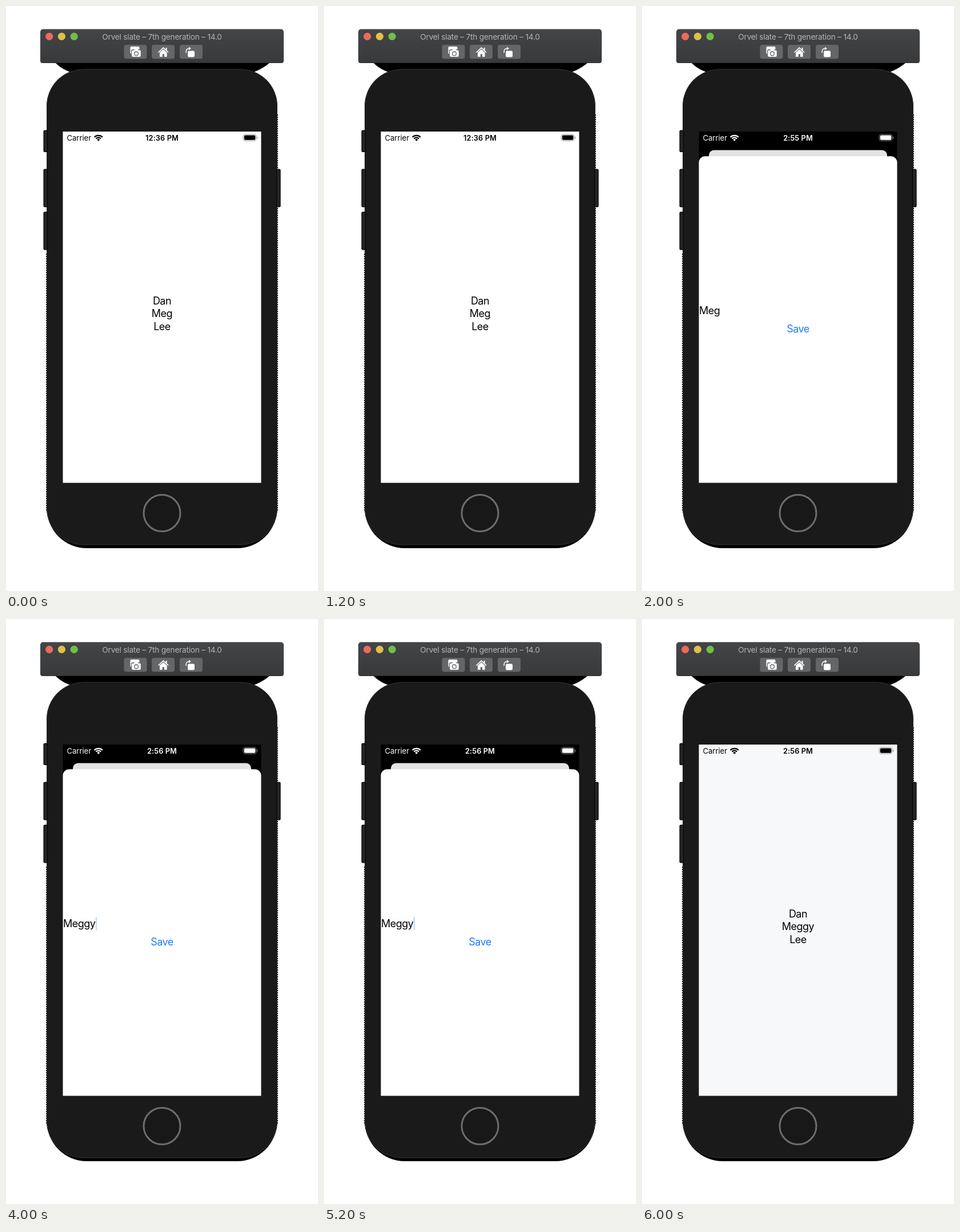
An HTML page with a canvas that plays this animation: 546x1025 px, repeating every 8000 ms.

```html
<!DOCTYPE html>
<html lang="en">
<head>
<meta charset="utf-8">
<title>Phone simulator</title>
<style>
html, body { margin: 0; width: 100%; height: 100%; overflow: hidden; background: #fff; }
canvas { display: block; width: 546px; height: 1025px; }
</style>
</head>
<body>
<canvas id="stage"></canvas>
<script>
const W = 546, H = 1025, STEP = 2000;
const canvas = document.getElementById('stage');
const ctx = canvas.getContext('2d');
const dpr = window.devicePixelRatio || 1;
canvas.width = W * dpr;
canvas.height = H * dpr;
ctx.scale(dpr, dpr);

const SCREEN = { x: 99.5, y: 220, w: 347, h: 615.5 };
const CX = 273;
const BUTTON = '#656668';

const scenes = [
  { clock: '12:36 PM', bg: '#fff', list: ['Dan', 'Meg', 'Lee'] },
  { clock: '2:55 PM', field: 'Meg' },
  { clock: '2:56 PM', field: 'Meggy', caret: true },
  { clock: '2:56 PM', bg: '#f7f8fa', list: ['Dan', 'Meggy', 'Lee'] }
];

function box(x, y, w, h, r, fill) {
  ctx.beginPath();
  ctx.roundRect(x, y, w, h, r);
  if (fill) {
    ctx.fillStyle = fill;
    ctx.fill();
  }
}

function disc(x, y, r, fill) {
  ctx.beginPath();
  ctx.arc(x, y, r, 0, Math.PI * 2);
  ctx.fillStyle = fill;
  ctx.fill();
}

function line(color, width) {
  ctx.strokeStyle = color;
  ctx.lineWidth = width;
  ctx.stroke();
}

function poly(points, fill) {
  ctx.beginPath();
  points.forEach(([x, y]) => ctx.lineTo(x, y));
  if (fill) {
    ctx.fillStyle = fill;
    ctx.fill();
  }
}

function text(str, x, y, { size = 18, weight = 400, gap = -0.5, color = '#000', align = 'center' } = {}) {
  ctx.font = `${weight} ${size}px Inter, Roboto, sans-serif`;
  ctx.letterSpacing = gap + 'px';
  ctx.textAlign = align;
  ctx.fillStyle = color;
  ctx.fillText(str, x, y);
  return ctx.measureText(str).width;
}

function drawShadow() {
  ctx.beginPath();
  ctx.moveTo(86, 99);
  ctx.quadraticCurveTo(94, 108, 108, 114);
  ctx.lineTo(150, 130);
  ctx.lineTo(396, 130);
  ctx.lineTo(438, 114);
  ctx.quadraticCurveTo(452, 108, 462, 99);
  ctx.fillStyle = '#000';
  ctx.fill();
  box(71.5, 300, 403, 650, [0, 0, 70, 70], '#000');
  // ragged sides
  for (let y = 190; y < 885; y += 4) {
    ctx.fillRect(475, y, 1, 2);
    if (y > 430) ctx.fillRect(70, y, 1, 2);
  }
}

function sideButton(x, y, h) {
  box(x, y, 7.6, h, 2.5, '#050505');
  box(x + 1.3, y + 1.3, 5, h - 2.6, 1.5, '#262626');
}

function drawPhone() {
  drawShadow();
  box(71, 110.5, 404, 834, 65, '#1a1a1a');
  box(71.5, 111, 403, 833, 64.5);
  line('#303030', 1);
  sideButton(65.5, 217.5, 38.5);
  sideButton(65.5, 285.5, 67);
  sideButton(65.5, 360.5, 67);
  sideButton(473, 285.5, 67);
  disc(CX, 888.5, 32, '#181818');
  line('#6d6d6d', 3);
}

function drawCameraIcon() {
  box(217.5, 71, 16, 13, 2, '#fff');
  box(219, 76, 18, 14, 3, BUTTON);
  box(220.2, 77.6, 15.6, 11.4, 2, '#fff');
  box(224.6, 75.9, 6.8, 4, 1.2, '#fff');
  disc(228, 83.4, 3.4, '#fff');
  line(BUTTON, 1.3);
}

function drawHomeIcon() {
  poly([[269, 81.5], [275.3, 75.7], [281.6, 81.5], [281.6, 89], [269, 89]], '#fff');
  ctx.fillStyle = '#fff';
  ctx.fillRect(279.6, 73, 2, 5);
  ctx.lineCap = 'round';
  poly([[267, 81], [275.3, 73.2], [283.6, 81]]);
  line('#fff', 1.7);
  ctx.lineCap = 'butt';
  ctx.fillStyle = BUTTON;
  ctx.fillRect(273.7, 84.3, 3.3, 4.7);
}

function drawRotateIcon() {
  box(318, 78.5, 12, 11, 2.2, '#fff');
  ctx.beginPath();
  ctx.moveTo(315.3, 82);
  ctx.bezierCurveTo(314.4, 77, 316.5, 74.4, 320.5, 74.4);
  line('#fff', 1.5);
  poly([[320, 71.5], [323.8, 74.4], [320, 77.3]], '#fff');
}

function drawWindowBar() {
  const shade = ctx.createLinearGradient(0, 40, 0, 100);
  shade.addColorStop(0, '#434547');
  shade.addColorStop(1, '#37393b');
  box(60, 40.5, 426, 59.5, [5, 5, 4, 4], shade);
  ctx.fillStyle = '#2b2c2d';
  ctx.fillRect(63, 99, 420, 1);
  disc(75.7, 53.3, 6.6, '#ed6a5e');
  disc(97.4, 53.3, 6.6, '#e0bf4b');
  disc(119.2, 53.3, 6.6, '#72be47');
  text('Orvel slate – 7th generation – 14.0', CX, 58.5, { size: 13.6, gap: -0.2, color: '#b4b5b6' });
  [206.5, 255, 304].forEach(x => box(x, 68, 40, 24.5, 4, BUTTON));
  drawCameraIcon();
  drawHomeIcon();
  drawRotateIcon();
}

function drawStatus(clock, ink, rim) {
  text('Carrier', 106.5, 235.7, { size: 13, gap: 0, color: ink, align: 'left' });
  text(clock, CX, 235.7, { size: 12.8, weight: 600, gap: 0.1, color: ink });

  const from = -Math.PI * 0.75, to = -Math.PI * 0.25;
  for (const r of [6.1, 10]) {
    ctx.beginPath();
    ctx.arc(161.8, 236.8, r, from, to);
    line(ink, 2.3);
  }
  ctx.beginPath();
  ctx.moveTo(161.8, 236.8);
  ctx.arc(161.8, 236.8, 3.6, from, to);
  ctx.fillStyle = ink;
  ctx.fill();

  box(415, 225, 23, 11.3, 3.3);
  line(rim, 1);
  box(416.7, 226.6, 19.7, 8.1, 2, ink);
  box(439.2, 228.8, 1.3, 3.9, [0, 1.3, 1.3, 0], rim);
}

function drawList({ bg, clock, list }) {
  const { x, y, w, h } = SCREEN;
  box(x, y, w, h, 0, bg);
  drawStatus(clock, '#000', '#a2a2a4');
  list.forEach((name, i) => text(name, CX, 523.3 + i * 22.1));
}

function drawSheet({ clock, field, caret }) {
  const { x, y, w, h } = SCREEN;
  box(x, y, w, h, 0, '#000');
  drawStatus(clock, '#fff', '#777');
  box(117, 252.5, 312, 30, [9, 9, 0, 0], '#e3e3e3');
  box(x, 263.3, w, y + h - 263.3, [10.5, 10.5, 0, 0], '#fff');
  const end = 100 + text(field, 100, 540.3, { align: 'left' });
  if (caret) box(end + 0.5, 522, 1.8, 23.5, 0.9, '#b5d3fa');
  text('Save', CX, 572.2, { color: '#1f7cf2' });
}

function draw(now) {
  const scene = scenes[Math.floor(now / STEP) % scenes.length];
  ctx.fillStyle = '#fff';
  ctx.fillRect(0, 0, W, H);
  drawPhone();
  drawWindowBar();
  if (scene.list) drawList(scene);
  else drawSheet(scene);
}

const start = performance.now();
function tick() {
  draw(performance.now() - start);
  requestAnimationFrame(tick);
}
tick();
</script>
</body>
</html>
```
